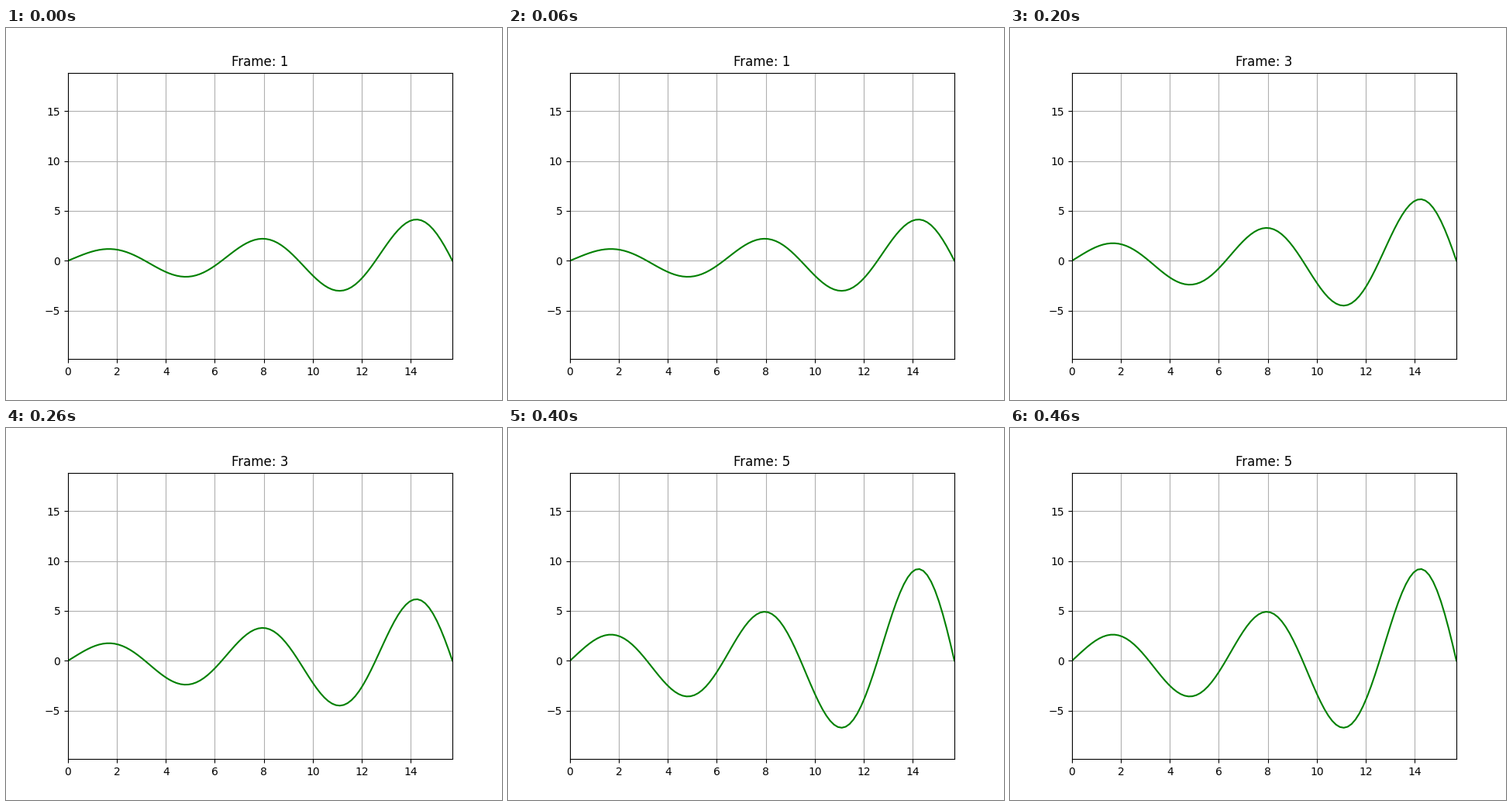
Recreate the animation shown at these times as a matplotlib script. Size 640 px wide and 480 px high, loop 500 ms.

```python
import numpy as np
import matplotlib.pyplot as plt
from matplotlib.animation import FuncAnimation

FRAMES = 5
INTERVAL = 100  # ms
X_MAX = 5 * np.pi
PAD = np.pi

x = np.linspace(0, X_MAX, 100)


def wave(step):
    """Sine with growing amplitude, scaled up exponentially each step."""
    return np.sin(x) * np.exp(0.1 * x + 0.2 * step)


fig, ax = plt.subplots(figsize=(6.4, 4.8), dpi=100)
ax.set_xlim(0, X_MAX)
ax.set_ylim(wave(FRAMES - 1).min() - PAD, X_MAX + PAD)
ax.grid(True)
line, = ax.plot(x, wave(0), color="green", lw=1.5)
title = ax.set_title("Frame: 1")


def update(i):
    line.set_ydata(wave(i))
    title.set_text(f"Frame: {i + 1}")
    return line, title


anim = FuncAnimation(fig, update, frames=FRAMES, interval=INTERVAL,
                     repeat=True, repeat_delay=0, blit=False)
plt.show()
```
